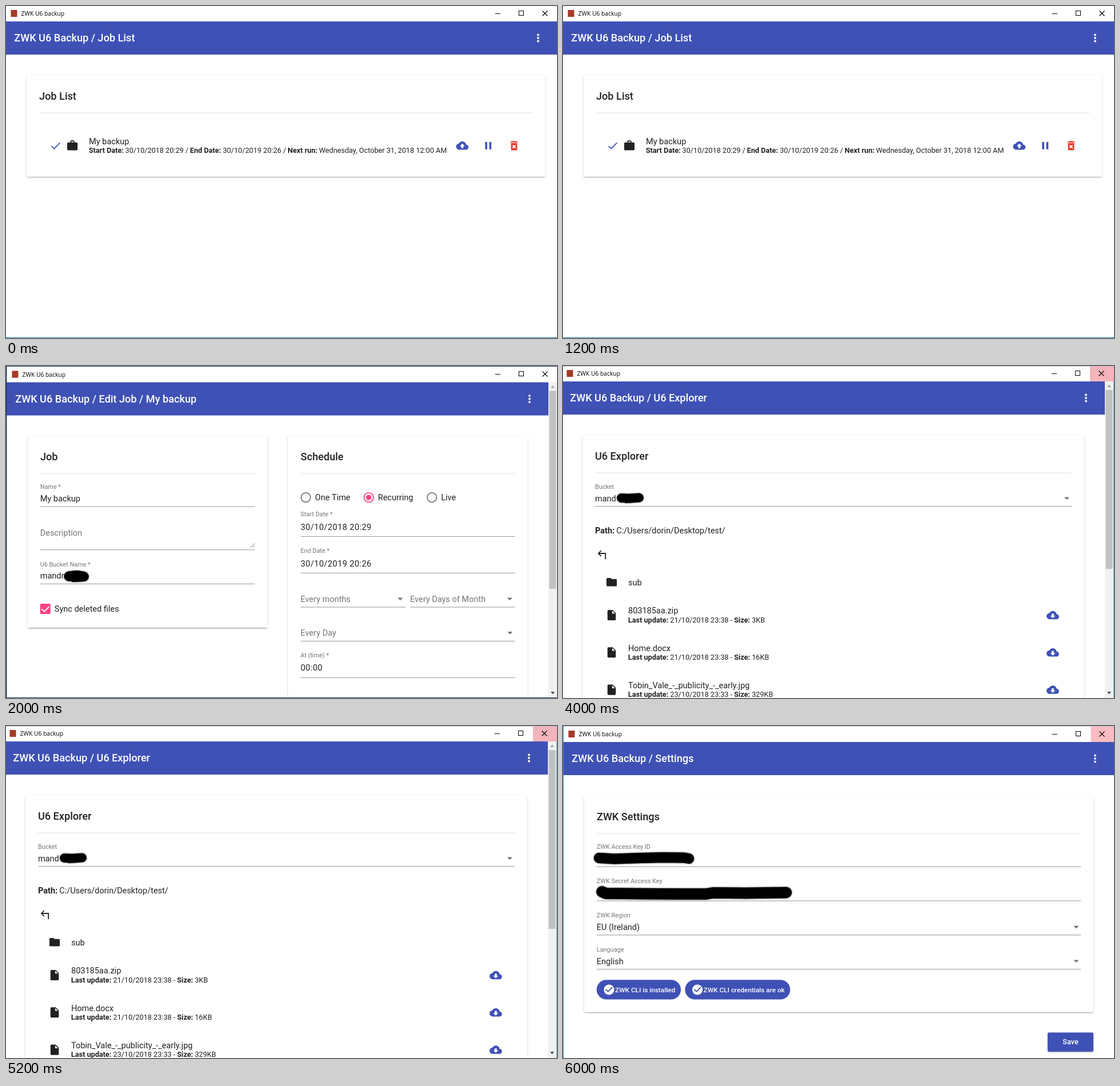
An HTML page with a canvas for the animation above (8 s loop, 963 by 581 pixels).

```html
<!DOCTYPE html>
<html lang="en">
<head>
<meta charset="utf-8">
<title>Backup</title>
<style>
html, body { margin: 0; height: 100%; overflow: hidden; background: #fff; }
canvas { display: block; }
</style>
</head>
<body>
<canvas id="stage" width="963" height="581"></canvas>
<script>
const W = 963, H = 581, HOLD = 2000;
const ctx = document.getElementById('stage').getContext('2d');

const INDIGO = '#3f51b5', PINK = '#ff4081', RED = '#e53e30';
const INK = 'rgba(0,0,0,.87)', SOFT = 'rgba(0,0,0,.54)', LINE = 'rgba(0,0,0,.42)';
const ZOOM = 0.906;
const HEAD = 20 * ZOOM, BODY = 16 * ZOOM, SMALL = 14 * ZOOM, LABEL = 12 * ZOOM;
const APP = 'ZWK U6 Backup';

const CLOUD = 'M19.35 10.04C18.67 6.59 15.64 4 12 4 9.11 4 6.6 5.64 5.35 8.04 2.34 8.36 0 10.91 0 14c0 3.31 2.69 6 6 6h13c2.76 0 5-2.24 5-5 0-2.64-2.05-4.78-4.65-4.96z';
const icons = {
  check: 'M9 16.17L4.83 12l-1.42 1.41L9 19 21 7l-1.41-1.41z',
  work: 'M20 6h-4V4c0-1.11-.89-2-2-2h-4c-1.11 0-2 .89-2 2v2H4c-1.11 0-2 .89-2 2v11c0 1.11.89 2 2 2h16c1.11 0 2-.89 2-2V8c0-1.11-.89-2-2-2zm-6 0h-4V4h4v2z',
  upload: CLOUD + 'M14 13v4h-4v-4H7l5-5 5 5h-3z',
  download: CLOUD + 'M17 13l-5 5-5-5h3V9h4v4h3z',
  pause: 'M6 19h4V5H6v14zm8-14v14h4V5h-4z',
  trash: 'M6 19c0 1.1.9 2 2 2h8c1.1 0 2-.9 2-2V7H6v12zm2.46-7.12l1.41-1.41L12 12.59l2.12-2.12 1.41 1.41L13.41 14l2.12 2.12-1.41 1.41L12 15.41l-2.12 2.12-1.41-1.41L10.59 14l-2.13-2.12zM15.5 4l-1-1h-5l-1 1H5v2h14V4z',
  folder: 'M10 4H4c-1.1 0-2 .9-2 2v12c0 1.1.9 2 2 2h16c1.1 0 2-.9 2-2V8c0-1.1-.9-2-2-2h-8l-2-2z',
  file: 'M6 2c-1.1 0-2 .9-2 2v16c0 1.1.9 2 2 2h12c1.1 0 2-.9 2-2V8l-6-6H6zm7 7V3.5L18.5 9H13z',
  done: 'M12 2C6.48 2 2 6.48 2 12s4.48 10 10 10 10-4.48 10-10S17.52 2 12 2zm-2 15l-5-5 1.41-1.41L10 14.17l7.59-7.59L19 8l-9 9z'
};
for (const name in icons) icons[name] = new Path2D(icons[name]);

function icon(name, cx, cy, color, zoom = ZOOM) {
  ctx.save();
  ctx.translate(cx - 12 * zoom, cy - 12 * zoom);
  ctx.scale(zoom, zoom);
  ctx.fillStyle = color;
  ctx.fill(icons[name], 'evenodd');
  ctx.restore();
}

function rect(x, y, w, h, color) {
  ctx.fillStyle = color;
  ctx.fillRect(x, y, w, h);
}

function round(x, y, w, h, r, color) {
  ctx.beginPath();
  ctx.roundRect(x, y, w, h, r);
  ctx.fillStyle = color;
  ctx.fill();
}

function disc(x, y, r, color) {
  ctx.beginPath();
  ctx.arc(x, y, r, 0, 7);
  ctx.fillStyle = color;
  ctx.fill();
}

function stroke(points, width, color) {
  ctx.beginPath();
  for (const [x, y] of points) ctx.lineTo(x, y);
  ctx.lineWidth = width;
  ctx.strokeStyle = color;
  ctx.stroke();
}

function text(str, x, y, size = BODY, color = INK, weight = 400, family = 'Roboto') {
  ctx.font = `${weight} ${size}px "${family}", sans-serif`;
  ctx.fillStyle = color;
  ctx.fillText(str, x, y);
}

const label = (str, x, y) => text(str, x, y, LABEL, SOFT);
const bold = (str, x, y, size = SMALL) => text(str, x, y, size, INK, 700);
const underline = (x1, x2, y) => rect(x1, y - 0.5, x2 - x1, 1, LINE);

function dateText(str, x, y) {
  ctx.letterSpacing = '0.45px';
  text(str, x, y);
  ctx.letterSpacing = '0px';
}

function caret(x, y) {
  ctx.beginPath();
  ctx.moveTo(x - 4.6, y - 2.2);
  ctx.lineTo(x + 4.6, y - 2.2);
  ctx.lineTo(x, y + 2.4);
  ctx.fillStyle = SOFT;
  ctx.fill();
}

// Stacked shadows: [inset, offset, blur, alpha]
function raised(x, y, w, h, color = '#fff') {
  for (const [inset, dy, blur, alpha] of [[1.8, 2.7, 1, 0.2], [0, 1.8, 1.8, 0.14], [0, 0.9, 4.5, 0.12]]) {
    ctx.save();
    ctx.shadowColor = `rgba(0,0,0,${alpha})`;
    ctx.shadowOffsetY = dy;
    ctx.shadowBlur = blur;
    round(x + inset, y + inset, w - 2 * inset, h - 2 * inset, 2, color);
    ctx.restore();
  }
  round(x, y, w, h, 2, color);
}

function card(x, y, w, h, title) {
  raised(x, y, w, h);
  text(title, x + 22, y + 42.6, HEAD, INK, 500);
  rect(x + 22, y + 65, w - 44, 1, 'rgba(0,0,0,.12)');
}

// Blacked-out strip
function smear(points, width) {
  ctx.save();
  ctx.lineCap = ctx.lineJoin = 'round';
  ctx.shadowColor = '#000';
  ctx.shadowBlur = 2.5;
  stroke(points, width, '#000');
  ctx.restore();
}

function windowFrame(dx, dy, page, right, hot) {
  rect(0, 0, W, H, '#fff');
  if (hot) rect(922 + dx / 2, 0, 42, 27 + dy, hot);
  rect(8.5 + dx, 7 + dy, 11, 12, '#a63a28');
  text('ZWK U6 backup', 26.5 + dx, 17 + dy, 10.3, '#000', 400, 'Open Sans');

  const cx = dx < 0 ? -1 : 0, cy = dy > 0 ? 1 : 0;
  rect(855 + cx, 13 + cy, 9, 1, '#000');
  ctx.lineWidth = 1;
  ctx.strokeStyle = '#000';
  ctx.strokeRect(896.5 + cx, 8.5 + cy, 8, 8);
  stroke([[937.5 + cx, 8.5 + cy], [946.5 + cx, 17.5 + cy]], 1.1, '#000');
  stroke([[946.5 + cx, 8.5 + cy], [937.5 + cx, 17.5 + cy]], 1.1, '#000');

  rect(0, 27 + dy, right, 58, INDIGO);
  text(`${APP} / ${page}`, 14.3 + dx, 62.4 + dy, HEAD, '#fff', 500);
  for (const k of [-1, 0, 1]) disc(right - 33, 56 + dy + k * 5.5, 1.9, '#fff');
}

function scrollbar(x, top, thumbEnd) {
  rect(x, top, W - x, H - top, '#f1f1f1');
  rect(x + 1.5, top + 15, 12, thumbEnd - top - 15, '#c1c1c1');
  const arrow = (y, d, color) => {
    ctx.beginPath();
    ctx.moveTo(x + 4, y + d);
    ctx.lineTo(x + 11, y + d);
    ctx.lineTo(x + 7.5, y - 2.5 * d / 2);
    ctx.fillStyle = color;
    ctx.fill();
  };
  arrow(top + 8, 2, '#a3a3a3');
  arrow(572, -2, '#505050');
}

function jobList() {
  windowFrame(0, 0, 'Job List', W);
  card(36, 121.5, 906, 177, 'Job List');
  icon('check', 86.8, 244.6, INDIGO);
  icon('work', 116, 244.3, INK);
  text('My backup', 145, 241.8);
  const y = 257;
  bold('Start Date:', 144.7, y);
  text('30/10/2018 20:29 /', 208.3, y, SMALL);
  bold('End Date:', 321.5, y);
  text('30/10/2019 20:26 /', 379, y, SMALL);
  bold('Next run:', 492.3, y);
  text('Wednesday, October 31, 2018 12:00 AM', 547, y, SMALL);
  icon('upload', 797.5, 244.3, INDIGO);
  icon('pause', 842.8, 244.3, INDIGO);
  icon('trash', 888, 244.3, RED);
  rect(0, 580, W, 1, '#1883c7');
}

function radio(x, name, on) {
  ctx.beginPath();
  ctx.arc(x, 230, 8.2, 0, 7);
  ctx.lineWidth = 1.8;
  ctx.strokeStyle = on ? PINK : SOFT;
  ctx.stroke();
  if (on) disc(x, 230, 4.6, PINK);
  text(name, x + 16, 235);
}

function select(name, x1, x2, y) {
  text(name, x1, y - 9.3, BODY, SOFT);
  underline(x1, x2, y);
  caret(x2 - 9, y - 14.2);
}

function editJob() {
  windowFrame(2, 1.5, 'Edit Job / My backup', 948);

  card(38, 122.5, 419, 335.5, 'Job');
  label('Name *', 59.7, 215.3);
  text('My backup', 59.7, 236.8);
  underline(59.5, 435, 246);
  text('Description', 59.7, 296.5, BODY, SOFT);
  underline(59.5, 435, 321.7);
  stroke([[427.5, 317.5], [434.5, 310.5]], 1, SOFT);
  stroke([[431.5, 317.5], [434.5, 314.5]], 1, SOFT);
  label('U6 Bucket Name *', 59.7, 350.5);
  text('mandr', 59.7, 372);
  smear([[110, 368], [124, 366.5], [136, 368.5], [118, 369.5]], 17);
  underline(59.5, 435, 381.3);
  round(59.7, 416, 18, 18, 2, PINK);
  stroke([[62.5, 425.3], [67, 429.7], [75.3, 421]], 1.9, '#fff');
  text('Sync deleted files', 84.8, 430);

  card(493, 122.5, 418.5, 500, 'Schedule');
  radio(524, 'One Time');
  radio(634, 'Recurring', true);
  radio(744.4, 'Live');
  label('Start Date *', 514.8, 262.7);
  dateText('30/10/2018 20:29', 515, 286.6);
  underline(515, 890, 298.4);
  label('End Date *', 514.8, 326.8);
  dateText('30/10/2019 20:26', 515, 350.5);
  underline(515, 890, 362.3);
  select('Every months', 514.8, 698, 422);
  select('Every Days of Month', 706.3, 889.5, 422);
  select('Every Day', 514.8, 890, 481.5);
  label('At (time) *', 514.8, 509.8);
  dateText('00:00', 515, 533.3);
  underline(515, 890, 545.3);

  scrollbar(948, 28.5, 390);
  rect(0, 0, W, 1, '#17375e');
  rect(0, 0, 1.4, H, '#17375e');
  rect(0, 580, W, 1, '#17375e');
}

function fileRow(i, name, date, size) {
  const y = 436 + i * 65.3;
  icon('file', 85, y, INK);
  text(name, 114, y - 2.6);
  bold('Last update:', 113.8, y + 12.6);
  text(date + ' -', 187.3, y + 12.6, SMALL);
  bold('Size:', 299, y + 12.6);
  text(size, 330, y + 12.6, SMALL);
  icon('download', 856, y, INDIGO);
}

function explorer() {
  windowFrame(-2, 0, 'U6 Explorer', 947, '#f4b4bb');
  card(34, 121.5, 877, 500, 'U6 Explorer');
  label('Bucket', 56, 214.7);
  text('mand', 56, 236.5);
  smear([[102, 231], [116, 231.8], [133, 230.5], [110, 232]], 15.5);
  underline(56, 889, 245.6);
  caret(880.5, 231.7);
  bold('Path:', 56, 292.8, BODY);
  text('C:/Users/dorin/Desktop/test/', 93.3, 292.8);
  stroke([[66.7, 323], [62, 328], [66.7, 333]], 1.8, INK);
  stroke([[62, 328], [74.2, 328], [74.2, 338.3]], 1.8, INK);
  icon('folder', 85, 378.3, INK);
  text('sub', 114, 383.5);
  fileRow(0, '803185aa.zip', '21/10/2018 23:38', '3KB');
  fileRow(1, 'Home.docx', '21/10/2018 23:38', '16KB');
  fileRow(2, 'Tobin_Vale_-_publicity_-_early.jpg', '23/10/2018 23:33', '329KB');
  scrollbar(947, 27, 355);
  rect(0, 0, W, 1, '#b9c3cf');
  rect(962, 27, 1, H, '#4a9fd8');
}

function chip(x, w, str) {
  round(x, 444.3, w, 34.3, 17.1, INDIGO);
  icon('done', x + 21.7, 461.5, '#fff');
  text(str, x + 32.3, 465.5, 13 * ZOOM, '#fff', 500);
}

function settings() {
  windowFrame(1, 1, 'Settings', W, '#f8bcc2');
  card(37, 122.3, 890, 378.2, 'ZWK Settings');
  const x = 58.8;
  ['ZWK Access Key ID', 'ZWK Secret Access Key', 'ZWK Region', 'Language'].forEach((name, i) => {
    label(name, x, 215.4 + i * 59.8);
    underline(x, 905, 246.2 + i * 59.8);
  });
  smear([[63, 231], [90, 232.5], [135, 231], [175, 230], [212, 230.5], [220, 232]], 18);
  smear([[68, 290], [75, 293], [130, 293.5], [200, 294], [250, 294], [262, 292], [320, 292.5], [390, 291.5]], 19.5);
  text('EU (Ireland)', x, 356.8);
  caret(897, 352);
  text('English', x, 416.5);
  caret(897, 411.7);
  chip(58.8, 147.2, 'ZWK CLI is installed');
  chip(213.3, 183.7, 'ZWK CLI credentials are ok');
  raised(847, 536.8, 80, 32.6, INDIGO);
  ctx.textAlign = 'center';
  text('Save', 887, 556.6, SMALL, '#fff', 500);
  ctx.textAlign = 'left';
  rect(0, 0, W, 1, '#b9c3cf');
  rect(0, 1, 1, H, '#2a8ad4');
}

const scenes = [jobList, editJob, explorer, settings];
const start = performance.now();
let shown = -1;

function tick() {
  const i = Math.floor((performance.now() - start) / HOLD) % scenes.length;
  if (i !== shown) scenes[shown = i]();
  requestAnimationFrame(tick);
}
tick();
</script>
</body>
</html>
```
